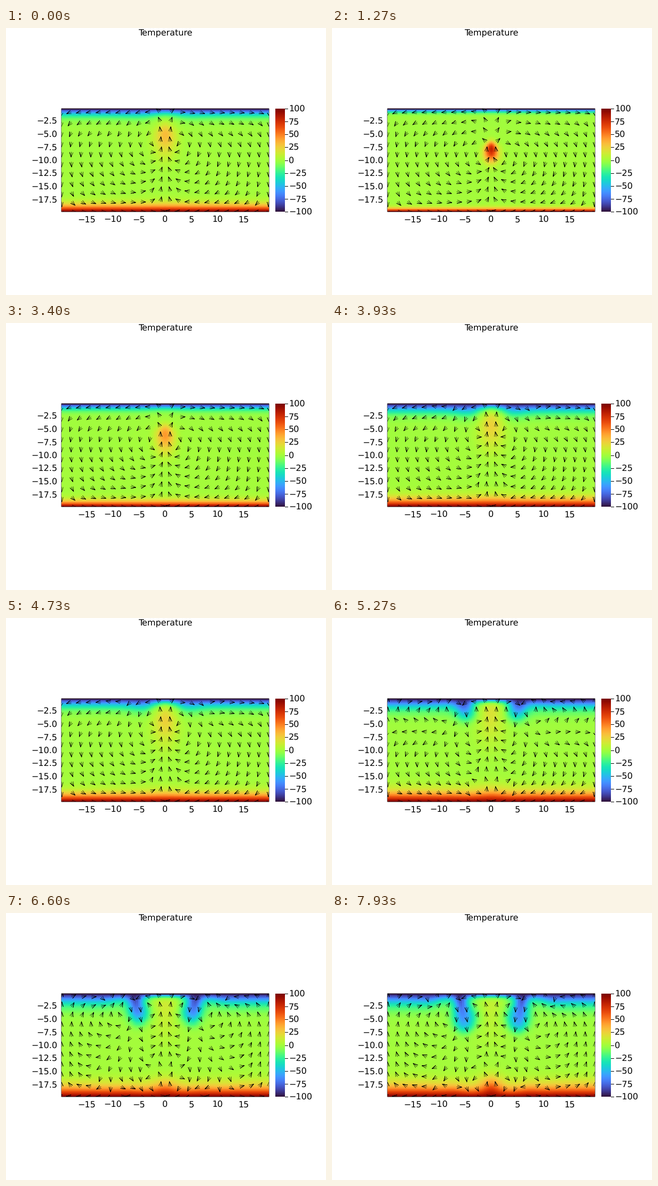
A matplotlib script for the animation above (8 s loop, 600x500 px).

```python
import numpy as np
import matplotlib.pyplot as plt
from matplotlib.animation import FuncAnimation
from matplotlib.collections import LineCollection
from matplotlib.patches import Rectangle

plt.rcParams["text.hinting"] = "none"

W, H, DPI = 600, 500, 100
FRAMES, INTERVAL = 200, 40

# Porous convection in a 40 x 20 box heated from below
LX, LY = 40.0, 20.0
NX, NY = 127, 63
DX, DY = LX / NX, LY / NY
DELTA_T, POROSITY, RAYLEIGH = 200.0, 0.1, 1000
DIFFUSIVITY = DELTA_T * LY / POROSITY / RAYLEIGH
XC = -LX / 2 + DX * (np.arange(NX) + 0.5)
YC = -LY + DY * (np.arange(NY) + 0.5)
STRIDE = 6

# Start time in ms and simulation step of each picture
SHOTS = [(0, 50), (1270, 20), (2600, 40), (3930, 60),
         (5270, 80), (6600, 100), (7930, 120)]


def laplace_modes(n, h, closed):
    """Eigenpairs of the 1D Laplacian with closed or fixed-value ends."""
    lap = np.diag(np.full(n, -2.0)) + np.eye(n, k=1) + np.eye(n, k=-1)
    if closed:
        lap[0, 0] = lap[-1, -1] = -1
    return np.linalg.eigh(lap / h**2)


def transform_solve(rhs, vx, vy, eig):
    return vx @ ((vx.T @ rhs @ vy) / eig) @ vy.T


EX, VX = laplace_modes(NX, DX, True)
EY, VY = laplace_modes(NY, DY, True)
P_EIG = EX[:, None] + EY
P_EIG[np.abs(P_EIG) < 1e-8] = np.inf
TX, UX = laplace_modes(NX - 2, DX, True)
TY, UY = laplace_modes(NY - 2, DY, False)
T_EIG = TX[:, None] + TY


def darcy_flux(temp):
    """Divergence-free flux on the cell faces."""
    qx, qy = np.zeros((NX + 1, NY)), np.zeros((NX, NY + 1))
    qy[:, 1:-1] = (temp[:, 1:] + temp[:, :-1]) / 2
    p = transform_solve(np.diff(qy, axis=1) / DY, VX, VY, P_EIG)
    qx[1:-1] = -np.diff(p, axis=0) / DX
    qy[:, 1:-1] -= np.diff(p, axis=1) / DY
    return qx, qy


def heat_rate(temp, qx, qy):
    """Diffusion minus upwind advection in the inner cells."""
    gx = np.diff(temp, axis=0)[:, 1:-1] / DX
    gy = np.diff(temp, axis=1)[1:-1] / DY
    flow = (np.maximum(qx[1:-2, 1:-1], 0) * gx[:-1]
            + np.minimum(qx[2:-1, 1:-1], 0) * gx[1:]
            + np.maximum(qy[1:-1, 1:-2], 0) * gy[:, :-1]
            + np.minimum(qy[1:-1, 2:-1], 0) * gy[:, 1:])
    spread = np.diff(gx, axis=0) / DX + np.diff(gy, axis=1) / DY
    return DIFFUSIVITY * spread - flow / POROSITY


def advance(old, qx, qy, dt):
    """One implicit step, iterated with the flux it drives."""
    temp = old.copy()
    operator = 1.5 / dt - DIFFUSIVITY * T_EIG
    for _ in range(25):
        rhs = (old - temp)[1:-1, 1:-1] / dt + heat_rate(temp, qx, qy)
        change = transform_solve(rhs, UX, UY, operator)
        temp[1:-1, 1:-1] += change
        temp[0], temp[-1] = temp[1], temp[-2]
        qx, qy = darcy_flux(temp)
        if np.abs(change).max() < 5e-3:
            break
    return temp, qx, qy


def simulate(steps):
    temp = DELTA_T * np.exp(-XC[:, None]**2 - (YC[None, :] + LY / 2)**2)
    temp[:, 0], temp[:, -1] = DELTA_T / 2, -DELTA_T / 2
    qx, qy = darcy_flux(temp)
    dt = 0.1 * min(DX, DY) / DELTA_T
    states = {}
    for it in range(1, max(steps) + 1):
        temp, qx, qy = advance(temp, qx, qy, dt)
        dt = min(5 * min(DX, DY) / DELTA_T,
                 POROSITY * min(DX / np.abs(qx).max(), DY / np.abs(qy).max()) / 2.1)
        if it in steps:
            states[it] = temp, arrows(qx, qy)
    return states


# Data units to stage pixels
SCALE, X0, Y0 = 9.8, 298.5, 149.5
HEAD_LEN, HEAD_HALF = 8.8, 3.2


def px(x):
    return X0 + SCALE * x


def py(y):
    return Y0 - SCALE * y


def arrows(qx, qy):
    """Unit arrows with open heads, as pixel polylines."""
    u = ((qx[1:] + qx[:-1]) / 2)[::STRIDE, ::STRIDE]
    v = ((qy[:, 1:] + qy[:, :-1]) / 2)[::STRIDE, ::STRIDE]
    mag = np.hypot(u, v) + 1e-12
    d = np.stack([u / mag, -v / mag], -1).reshape(-1, 2)
    gx, gy = np.meshgrid(px(XC[::STRIDE]), py(YC[::STRIDE]), indexing="ij")
    tail = np.stack([gx, gy], -1).reshape(-1, 2)
    tip = tail + SCALE * d
    side = np.stack([-d[:, 1], d[:, 0]], -1) * HEAD_HALF
    back = tip - HEAD_LEN * d
    return np.stack([tail, tip, back + side, tip, back - side], 1)


states = simulate({step for _, step in SHOTS})

fig = plt.figure(figsize=(W / DPI, H / DPI), dpi=DPI, facecolor="white")
ax = fig.add_axes([0, 0, 1, 1])
ax.axis("off")
PT = 72 / DPI


def label(x, y, text, ha="center"):
    """Text with its capitals centred on y."""
    ax.text(x, y + 5.8, text, ha=ha, va="baseline", fontsize=16 * PT,
            family="DejaVu Sans", color="black")


left, right = px(XC[0]), px(XC[-1])
top, bottom = py(YC[-1]), py(YC[0])
ax.add_patch(Rectangle((left, top), right - left, bottom - top, fill=False,
                       edgecolor="black", lw=PT, snap=False, zorder=0))

label(298.5, 8.5, "Temperature")
for x in range(-15, 16, 5):
    label(px(x), 358, str(x).replace("-", "\u2212"))
for k in range(1, 8):
    label(96.5, py(-2.5 * k), f"\u2212{2.5 * k:.1f}", "right")

clip = Rectangle((left, top), right - left, bottom - top, transform=ax.transData)
heat = ax.imshow(np.zeros((NY, NX)), cmap="turbo", vmin=-100, vmax=100,
                 extent=(px(-LX / 2), px(LX / 2), py(-LY), py(0)),
                 origin="lower", interpolation="nearest", aspect="auto", zorder=1)
heat.set_clip_path(clip)
quiver = LineCollection([], colors="black", linewidths=0.65 * PT, zorder=2)
ax.add_collection(quiver)
quiver.set_clip_path(clip)

# Colour bar
ax.imshow(np.linspace(-1, 1, 256)[:, None], cmap="turbo", origin="lower",
          extent=(505, 523, bottom, top), aspect="auto", zorder=1)
for value in range(-100, 101, 25):
    y = bottom + (top - bottom) * (value + 100) / 200
    ax.plot([523, 528], [y, y], color="black", lw=PT)
    label(530, y, str(value).replace("-", "\u2212"), "left")

ax.set_xlim(0, W)
ax.set_ylim(H, 0)


def update(i):
    end = (i + 1) * INTERVAL
    step = [s for start, s in SHOTS if start < end][-1]
    temp, lines = states[step]
    heat.set_data(temp.T)
    quiver.set_segments(lines)
    return heat, quiver


anim = FuncAnimation(fig, update, frames=FRAMES, interval=INTERVAL, repeat=True)
plt.show()
```
